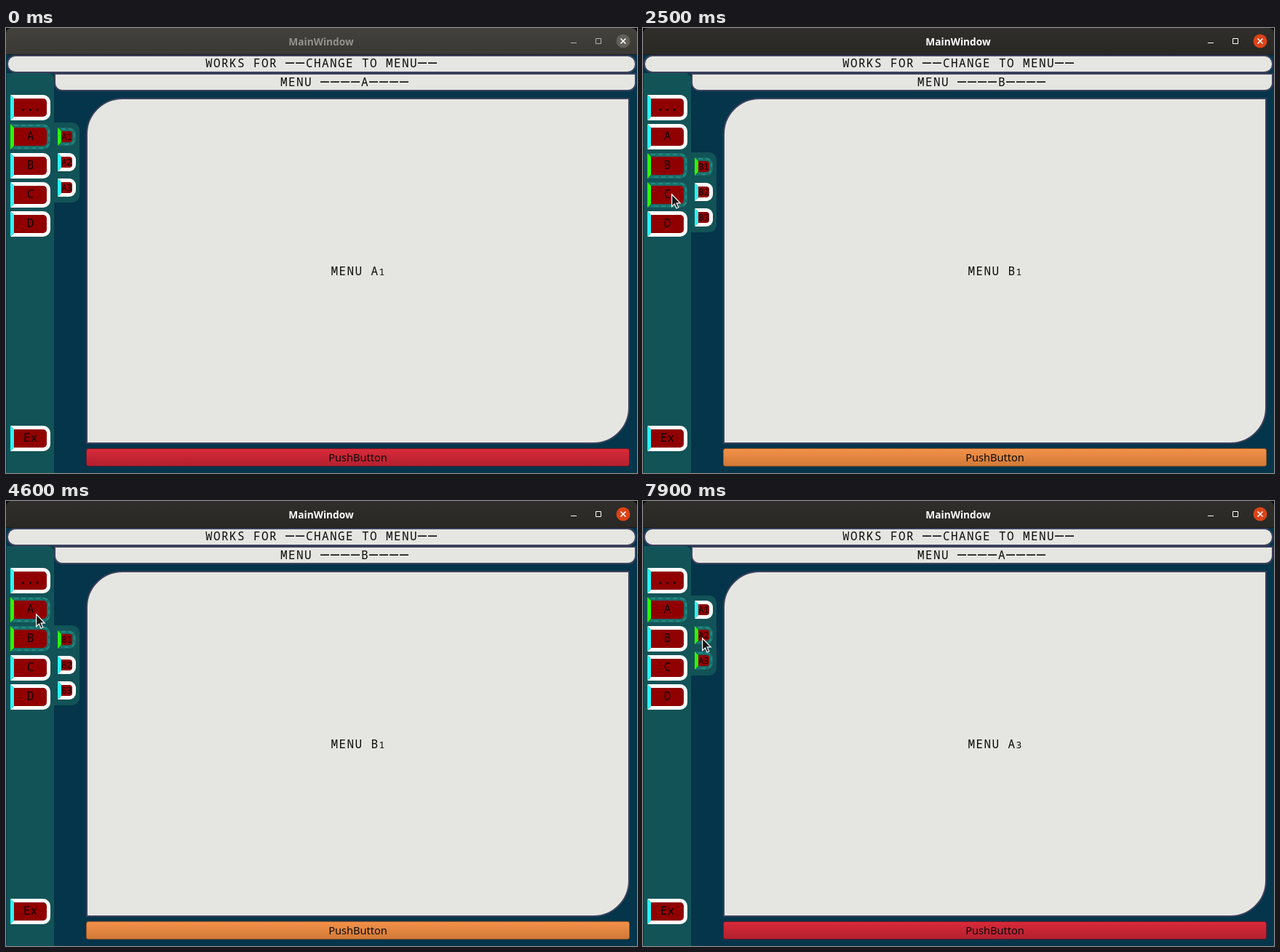
An HTML page for the animation above (8000 ms loop, 867x612 px).

```html
<!DOCTYPE html>
<html lang="en">
<head>
<meta charset="utf-8">
<title>MainWindow</title>
<style>
  html, body { margin: 0; width: 100%; height: 100%; overflow: hidden; background: #04354a; }
  #stage { position: absolute; left: 0; top: 0; width: 867px; height: 612px; overflow: hidden; background: #04354a; }
  #stage div, svg { position: absolute; box-sizing: border-box; }
  svg { left: 0; top: 0; }
  .corners { left: 0; top: 0; width: 867px; height: 37px; background: #000; }
  .title {
    left: 0; top: 0; width: 867px; height: 37px; border-radius: 7px 7px 0 0;
    border-bottom: 1px solid #1c1c1a;
    background: linear-gradient(#0000, #0002), color-mix(in srgb, #2f2e2a var(--focus), #42413c);
  }
  .card { background: #e5e6e1; border: 2px solid #3c405c; }
  .head { left: 1px; top: 37px; width: 865px; height: 25px; border-radius: 12px; }
  .sub { left: 66px; top: 62px; width: 800px; height: 25px; border-radius: 0 0 11px 11px; }
  .page { left: 110px; top: 96px; width: 747px; height: 476px; border-radius: 50px 0; }
  .side { left: 1px; top: 62px; width: 65px; height: 550px; background: #125357; border-radius: 0 8px 0 0; }
  .panel { left: 66px; width: 35px; height: 110px; background: #125357; border-radius: 0 10px 10px 0; }
  .push { left: 110px; top: 578px; width: 747px; height: 25px; border: 1px solid; border-radius: 3px; }
  .btn {
    left: 6px; width: 55px; height: 35px;
    border: 5px solid #fff; border-left-color: #2af6f6; border-radius: 0 10px 10px 0;
    background: #900000; color: #0c0606;
    font: 16px/22px "Noto Sans Mono", monospace; text-align: center; white-space: nowrap;
  }
  .btn.small { left: 5px; width: 25px; height: 25px; border-radius: 0 9px 9px 0; font-size: 12px; line-height: 15px; }
  .btn.on { border-color: #1b6c69; border-left-color: #2cf800; }
  .btn.on::after {
    content: ""; position: absolute; inset: -4px -4px -4px 0;
    border: 2px dashed #1f8b82; border-left: 0; border-radius: 0 8px 8px 0;
  }
  .hand { font: 16px "Noto Sans Mono", monospace; letter-spacing: 1.4px; fill: #0a0a0a; }
  .dash { font-size: 20px; letter-spacing: 2px; }
  .digit { font-size: 13px; }
  text { text-anchor: middle; }
  .name { font: bold 13.7px "Noto Sans", sans-serif; fill: color-mix(in srgb, #fff var(--focus), #94928b); }
  .label { font: 14.6px "Noto Sans", sans-serif; fill: #0a0a0a; }
  .tool { fill: none; stroke: color-mix(in srgb, #fff var(--focus), #b5b3ac); }
  .close { fill: color-mix(in srgb, #dc4318 var(--focus), #625f59); }
</style>
</head>
<body>
<div id="stage">
  <div class="corners"></div>
  <div class="title"></div>
  <div class="card head"></div>
  <div class="card sub"></div>
  <div class="side"></div>
  <div class="panel" id="panel"></div>
  <div class="card page"></div>
  <div class="push" id="push"></div>
  <svg width="867" height="612">
    <text class="name" x="433" y="24">MainWindow</text>
    <path class="tool" d="M776 20.5h8M810.5 14.5h7v7h-7z"/>
    <circle class="close" cx="848" cy="18" r="9.5"/>
    <path d="M844.5 14.5l7 7m0-7l-7 7" stroke="#fff" stroke-width="1.6"/>
    <text class="hand" id="headText" x="434" y="54"></text>
    <text class="hand" id="subText" x="466" y="80"></text>
    <text class="hand" id="pageText" x="484" y="340"></text>
    <text class="label" x="483.5" y="596">PushButton</text>
    <path id="cursor" d="M.6 .8V17.6L4.4 14 7 20 9.8 18.8 7.2 12.9H12.2Z" fill="#151515" stroke="#fff" stroke-width="1.2"/>
  </svg>
</div>
<script>
const $ = id => document.getElementById(id);
const stage = $("stage"), panel = $("panel"), push = $("push"), cursor = $("cursor");
const LOOP = 8000, MENUS = "ABCD";

// top, bottom and edge colour of the push button per menu
const PAINT = {
  A: ["#d92a3a", "#b3202f", "#6d1829"],
  B: ["#f29149", "#d17a37", "#9a5526"],
  C: ["#7c4c82", "#6c4574", "#8a5a91"],
  D: ["#88d93d", "#6db52d", "#4f8a22"],
};

// time, then heading menu, open menu and open page
const STATES = [
  [0, "AA1"], [1800, "BA1"], [2000, "BB1"], [2800, "CB1"], [2900, "CC1"],
  [3500, "DC1"], [3600, "DD1"], [4000, "CD1"], [4100, "CC1"],
  [4500, "BB1"], [4900, "AA1"], [6500, "AA2"], [7100, "AA3"],
];

// time, then pointer tip
const MOVES = [
  [0, -50, -50], [900, 110, 62], [1000, 62, 118], [1100, 38, 147],
  [1300, 38, 150], [1400, 37, 161], [1500, 36, 174], [1600, 36, 183],
  [2200, 35, 216], [2500, 39, 228], [3000, 40, 265],
  [3700, 40, 244], [3900, 40, 234], [4200, 41, 195], [4600, 41, 155],
  [5100, 60, 156], [5200, 80, 155], [5300, 95, 155], [5700, 89, 154], [5800, 82, 153],
  [6100, 82, 182], [6300, 81, 188], [6700, 81, 203], [6800, 80, 217],
  [7500, 78, 211], [7600, 77, 207], [7800, 79, 198], [7900, 81, 188],
];

const last = (list, t) => list.findLast(step => step[0] <= t);

function addButton(parent, top, text, cls = "btn") {
  const el = document.createElement("div");
  el.className = cls;
  el.style.top = top + "px";
  el.textContent = text;
  parent.append(el);
  return el;
}

function write(id, text) {
  const html = text.replace(/—+/g, '<tspan class="dash">$&</tspan>')
                   .replace(/\d/, '<tspan class="digit">$&</tspan>');
  if ($(id).dataset.text !== text) $(id).innerHTML = html;
  $(id).dataset.text = text;
}

addButton(stage, 92, "...").style.fontWeight = "bold";
const mains = [...MENUS].map((m, i) => addButton(stage, 132 + 40 * i, m));
addButton(stage, 547, "Ex");
const smalls = [0, 1, 2].map(i => addButton(panel, 7 + 35 * i, "", "btn small"));
stage.append(document.querySelector("svg"));
write("headText", "WORKS FOR ——CHANGE TO MENU——");

function draw(t) {
  const [head, menu, page] = last(STATES, t)[1];
  const [, x, y] = last(MOVES, t);
  const index = MENUS.indexOf(menu), panelTop = Math.round(130 + 40.6 * index);
  const over = (left, top, w, h) => x >= left && x < left + w && y >= top && y < top + h;

  const focus = Math.min(Math.max(Math.floor((t - 600) / 100) / 3, 0), 1);
  stage.style.setProperty("--focus", focus * 100 + "%");

  mains.forEach((el, i) =>
    el.classList.toggle("on", i === index || over(6, 132 + 40 * i, 55, 35)));
  smalls.forEach((el, i) => {
    el.textContent = menu + (i + 1);
    el.classList.toggle("on", i === page - 1 || over(71, panelTop + 7 + 35 * i, 25, 25));
  });
  panel.style.top = panelTop + "px";

  const [top, bottom, edge] = PAINT[menu];
  push.style.background = `linear-gradient(${top}, ${bottom})`;
  push.style.borderColor = edge;

  write("subText", `MENU ————${head}————`);
  write("pageText", `MENU ${menu}${page}`);
  cursor.setAttribute("transform", `translate(${x} ${y})`);
}

const start = performance.now();
function tick() {
  draw((performance.now() - start) % LOOP);
  requestAnimationFrame(tick);
}
tick();
</script>
</body>
</html>
```
